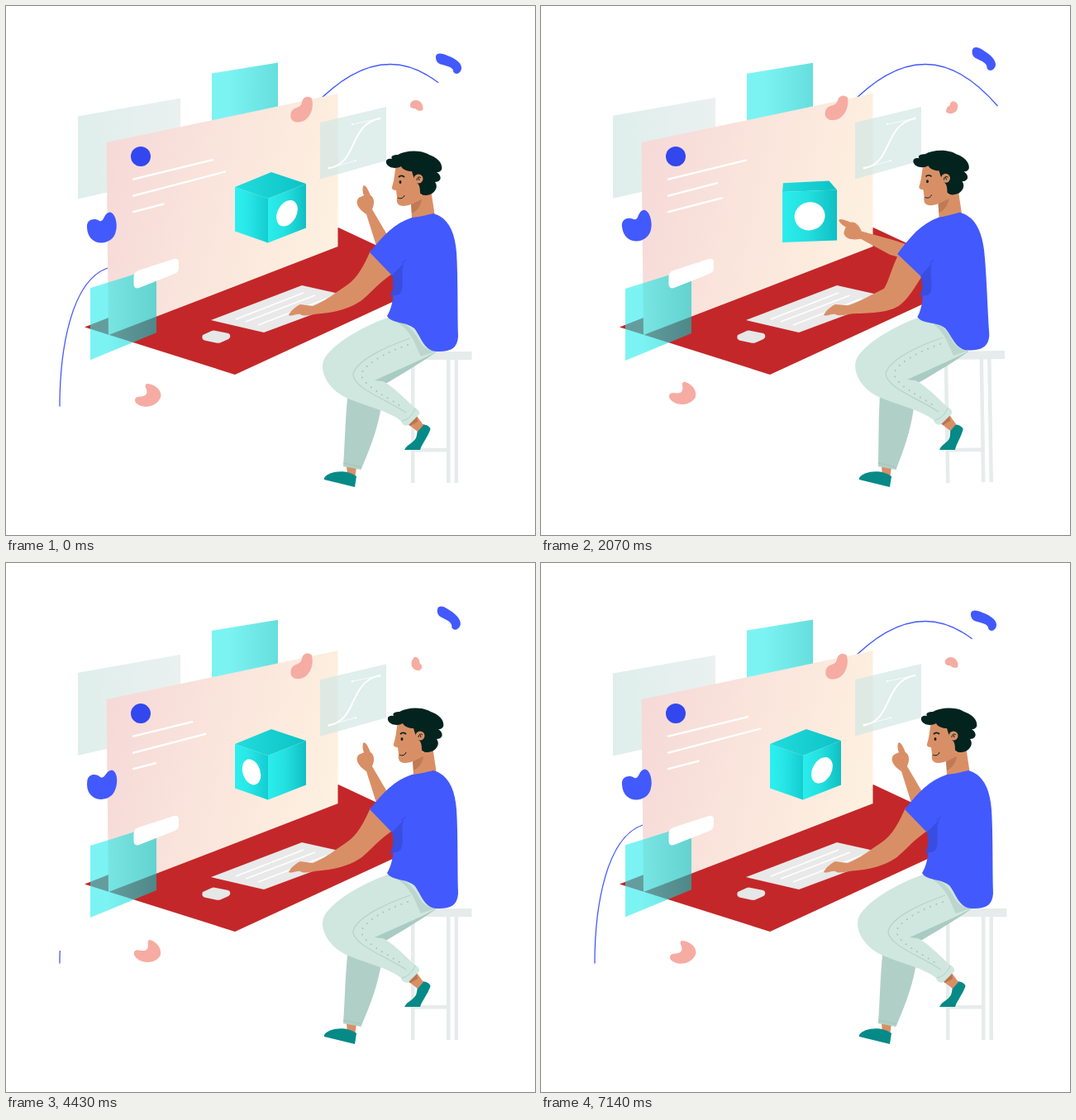
Write an HTML page that moves like this. It is 640 by 640 pixels and loops after 7.21 s.

```html
<!DOCTYPE html>
<html lang="en">
<head>
<meta charset="utf-8">
<title>Desk scene</title>
<style>
html, body { margin: 0; width: 100%; height: 100%; overflow: hidden; background: #fff; }
svg { display: block; width: 100vw; height: 100vh; }
</style>
</head>
<body>
<svg viewBox="0 0 640 640" xmlns="http://www.w3.org/2000/svg">
<defs>
  <linearGradient id="screenFill" x1="0" y1=".35" x2="1" y2=".6">
    <stop offset="0" stop-color="#f6dad8"/><stop offset=".45" stop-color="#fae5dc"/><stop offset="1" stop-color="#fef1e0"/>
  </linearGradient>
  <linearGradient id="cyan"><stop offset=".25" stop-color="#25ebeb"/><stop offset="1" stop-color="#00c8c8"/></linearGradient>
  <linearGradient id="mist"><stop offset="0" stop-color="#dfeeeb"/><stop offset="1" stop-color="#eaf1f0"/></linearGradient>
  <linearGradient id="sideFill"><stop offset="0" stop-color="#2cf0f0"/><stop offset=".4" stop-color="#28e6e7"/><stop offset="1" stop-color="#13cdd0"/></linearGradient>
  <linearGradient id="faceFill"><stop offset="0" stop-color="#2bedec"/><stop offset=".45" stop-color="#24e0e1"/><stop offset="1" stop-color="#0fbfc3"/></linearGradient>
  <linearGradient id="topFill"><stop offset="0" stop-color="#22dcdd"/><stop offset="1" stop-color="#0cc2c5"/></linearGradient>
</defs>

<path id="mistLeft" d="M87 134L211 112V206L87 234Z" fill="url(#mist)"/>
<path id="cyanTop" d="M249 81L329 68V140L249 160Z" fill="url(#cyan)" opacity=".6"/>
<g fill="none" stroke="#4259fd" stroke-width="1.3">
  <path id="arcLeft" pathLength="1" d="M65 484.500C65 415 79 332 123 317"/>
  <path id="arcRight" pathLength="1" d="M372 121C402 90 432 70.500 465 70.500C500 70.500 530 95 552.500 121"/>
</g>

<path d="M95 388.500L402 268L531.700 328.500L277 446Z" fill="#c42729"/>
<path d="M248 380L358 338L425 353L312 395Z" fill="#e9e9e9"/>
<path d="M278 379L360 347M290 382L374 350M305 386L388 354" stroke="#fff" stroke-width="1.600"/>
<path d="M238 398L249 393Q251 392 254 393L269 396Q272 397 271 401Q270 403 267 404L259 407.500Q257 408 254 407.500L240 404.500Q236 403 238 398Z" fill="#e6e7e7"/>

<g id="screen">
  <path d="M121.500 165L401.500 106V291L124 398Z" fill="url(#screenFill)"/>
  <circle cx="163" cy="182" r="12" fill="#3347ee"/>
  <path id="lines" stroke="#fff" stroke-width="2.300" stroke-linecap="round"/>
  <path id="cubeTop" fill="url(#topFill)"/>
  <path id="cubeLeft" fill="url(#sideFill)"/>
  <path id="cubeFront" fill="url(#faceFill)"/>
  <path id="cubeRight" fill="url(#faceFill)"/>
  <circle id="dotA" r=".28" fill="#fff"/>
  <circle id="dotB" r=".28" fill="#fff"/>
</g>
<path id="cyanLow" d="M102 341L182 316V395L102 428Z" fill="url(#cyan)" opacity=".6"/>
<path id="bar" d="M154.500 328Q154.500 322 160 320L203 306Q209 304.500 209 310V317Q209 322 204 324L161 341Q154.500 343 154.500 336Z" fill="#fff"/>
<g id="mistRight">
  <path d="M380 141L460 122V187L380 209.500Z" fill="#d5e8e5" opacity=".72"/>
  <g fill="none" stroke="#fff">
    <path d="M391 196C426 190 414 144 452 136" stroke-width="2"/>
    <path d="M391 196L423 187M419 143L452 136" stroke-width=".8"/>
  </g>
  <g fill="#fff"><circle cx="391" cy="196" r="1.500"/><circle cx="452" cy="136" r="1.500"/><circle cx="423" cy="187" r="1.200"/><circle cx="419" cy="143" r="1.200"/></g>
</g>

<g fill="#4259fd">
  <path id="blobLeft" d="M98 268C97 258 107 256 113 260C119 262 118 250 126 249.500C133 251 135 265 133 272C130 291 99 293 98 268Z"/>
  <path id="blobRight" d="M520 62C520 56 528 57 534 60C545 64 552 70 551 76C549 83 544 83 541.500 80C541 74 535 73 528 71C522 70 520 66 520 62Z"/>
</g>
<g fill="#f6aca2">
  <path id="pinkTop" d="M489 120C489 114 496 113 500 115C504 118 505.500 123 504 126C500 128 497 126 495 124C491 124 489 123 489 120Z"/>
  <path id="pinkMid" d="M344.500 131C346 121 356 125 358 117C359 109.500 366 108 370 112C373 124 368 134 361 138.500C352 143 343 140 344.500 131Z"/>
  <path id="pinkLow" d="M156 476C158 470 167 475 170 469C172 464 166 460 170 457C178 457 188 463 187.500 472C184 485 166 488 158 481C156 479 156 478 156 476Z"/>
</g>

<g id="stool" fill="#e6eceb">
  <path d="M488 418H563.500V428H488ZM490 428H494.500V577H490ZM533 428H537.500V577H533ZM542.500 428H547V577H542.500ZM494 535H533V539.500H494Z"/>
</g>
<path d="M412 556L424 558L422 572L413 570Z" fill="#d98f66"/>
<path d="M385 571C390 562 413 560 424 569L422 582L385 573Z" fill="#058a87"/>
<g id="farLeg">
  <path d="M415 455L456 470C452 510 438 540 429.500 561L408 557C410 530 410 500 415 455Z" fill="#b0d0c7"/>
  <path d="M408 553L429 557.500" stroke="#a3c5bb" stroke-width="1"/>
</g>
<g id="shoe">
  <path d="M499 507C506 505 513 508 513.500 512C510 522 503 530 501 537L482 537C486 529 496 528 497 519Z" fill="#058a87"/>
</g>
<g id="nearLeg">
  <path d="M484 504L497 496L505 507L498 515Z" fill="#d98f66"/>
  <path d="M484 504L497 496L498 503L489 508Z" fill="#b97450"/>
  <path d="M442 456C455 436 490 418 508 412L520 419C500 433 478 446 461 456Z" fill="#a9cbc1"/>
  <path d="M462 377C438 385 397 406 385 427C378 442 390 465 414 475C438 485 463 490 478 502C479 506 483 509 487 507L500 494C501 488 495 487 491 483C480 472 465 458 456 454L446 453C467 443 497 431 519 419C505 415 502 400 495 388C485 376 470 378 462 377Z" fill="#cfe7df"/>
  <path d="M462 377C478 380 492 388 500 405C504 412 510 417 519 418L502 424C494 408 490 388 462 377Z" fill="#bcd6ce"/>
  <path d="M489 402C460 412 425 428 420 445C419 462 460 476 484 492" fill="none" stroke="#b9d1c9" stroke-width="1.200"/>
  <path d="M486 410C458 419 431 436 430 446C432 460 460 472 482 487" fill="none" stroke="#a5c3ba" stroke-width="2" stroke-linecap="round" stroke-dasharray="0 8"/>
  <path d="M479 502C487 500 492 495 495 487" fill="none" stroke="#b5d0c7" stroke-width="1"/>
</g>

<path id="farArm" fill="#d98f66" d="M-24 -71C-20 -70 -18 -63 -16 -59C-11 -56 -11 -49 -14 -42L6 -8L24 26L8 32L-9 2L-21 -36C-29 -41 -34 -48 -32 -53C-31 -57 -27 -57 -24 -59C-26 -63 -26 -70 -24 -71Z"/>
<path id="nearArm" fill="#d98f66"/>

<g id="head">
  <path d="M490 236L514 222L519 255C510 261 498 261 491 257Z" fill="#d98f66"/>
  <path d="M490 240L503 234C502 242 497 248 491 251Z" fill="#bf7a56"/>
  <path d="M472 192C470 203 470 210 467 219C466 222 470 223 472 223L473 231C472 238 474 242 481 242C491 241 498 237 502 229L508 205L490 188Z" fill="#d98f66"/>
  <path d="M460 190C459 185 463 184 467 185C465 182 468 180 474 180C484 174 503 174 512 180C522 183 529 191 527 198C525 201 523 201 521 201C527 205 528 212 519 213C523 218 520 225 513 228C507 230 502 229 501 226C501 219 500 216 497 214C493 208 492 203 491 200C486 200 480 198 478 194C473 197 463 197 460 190Z" fill="#03231f"/>
  <circle cx="499" cy="209" r="5.500" fill="#d98f66"/>
  <path d="M497 211C497 207 500 206 502 208M499 208L500 211" fill="none" stroke="#03231f" stroke-width="1"/>
  <path d="M475 207C477 205 480 205 482 207" fill="none" stroke="#03231f" stroke-width="1.800"/>
  <ellipse cx="477" cy="213" rx="1.400" ry="2" fill="#03231f"/>
  <path d="M474 232C478 234 481 232 482 229" fill="none" stroke="#03231f" stroke-width="1"/>
</g>
<g id="torso">
  <path d="M491 256C499 255 509 253 517 251C535 256 543 273 545 298C547 330 546 370 547 400C546 414 538 419 520 418C505 416 502 400 494 390C483 381 467 385 461 375C466 368 471 350 468 327L440 298C457 277 470 263 491 256Z" fill="#4259fd"/>
  <path d="M467 326L484 308C475 317 483 335 478 346C474 353 467 347 463 354C468 346 470 338 467 326Z" fill="#394de0"/>
  <path d="M478 311L484 307" stroke="#394de0" stroke-width="1"/>
</g>
</svg>
<script>
const LOOP = 7210, FRAMES = 101, FPS = 14, CYCLE = 7.15;
const TIMES = [0, 0.857, 2.071, 3.214, 4.429, 5.571];
const el = {};
document.querySelectorAll('[id]').forEach(n => el[n.id] = n);
const set = (name, attr, value) => el[name].setAttribute(attr, value);
const move = (name, value) => set(name, 'transform', value);

// Cyclic monotone cubic through one value per entry of TIMES.
function key(vals, t) {
  const n = TIMES.length;
  const time = i => TIMES[(i + n) % n] + Math.floor(i / n) * CYCLE;
  const val = i => vals[(i + n) % n];
  const slope = i => (val(i + 1) - val(i)) / (time(i + 1) - time(i));
  const tangent = i => {
    const a = slope(i - 1), b = slope(i);
    return a * b > 0 ? 2 * a * b / (a + b) : 0;
  };
  let i = n - 1;
  while (i && t < TIMES[i]) i--;
  const h = time(i + 1) - time(i), s = (t - time(i)) / h, r = 1 - s;
  return r * r * (1 + 2 * s) * val(i) + s * s * (3 - 2 * s) * val(i + 1)
    + h * s * r * (r * tangent(i) - s * tangent(i + 1));
}

const clamp = x => Math.max(0, Math.min(1, x));
function ease(from, to, t) {
  const p = clamp((t - from) / (to - from));
  return p * p * (3 - 2 * p);
}
const wave = (t, peak, period) => Math.cos(2 * Math.PI * (t - peak) / period);
const bob = (t, peak) => wave(t, peak, CYCLE / 3);

function trim(name, from, to) {
  set(name, 'visibility', to - from > 0.002 ? 'visible' : 'hidden');
  set(name, 'stroke-dasharray', `${to - from} 3`);
  set(name, 'stroke-dashoffset', -from);
}

function mix(a, b, k) {
  const other = b.match(/[\d.]+/g);
  let i = 0;
  return a.replace(/[\d.]+/g, n => (+n + (other[i++] - n) * k).toFixed(2));
}

const ARM_REST = 'M441 296C434 312 425 330 412 338C400 346 385 358 371 363L356 361C349 364 343 371 342 374C346 376 352 372 356 373C362 377 372 372 382 372C405 370 425 362 435 352C444 344 452 334 470 322Z';
const ARM_LEAN = 'M428 302C418 320 418 336 417 344C402 350 385 358 372 362L356 361C349 364 343 371 342 374C346 376 352 372 356 373C362 376 372 372 382 372C405 373 428 374 438 364C448 355 452 344 458 326Z';

function drawLines(t) {
  const line = (y, mean, amp, peak, slope) => {
    const x = mean + amp * wave(t, peak, CYCLE / 2);
    return `M154 ${y}L${x} ${y - (x - 154) * slope}`;
  };
  set('lines', 'd', line(209.5, 244, 20, 2.85, 0.245) + line(229.5, 237.8, 27.2, 0.03, 0.262)
    + line(249, 200.6, 21.5, 2.4, 0.26));
}

// Top corners at rest (left, front, right, back) and halfway through the quarter turn.
const REST = [[277, 219], [317, 233], [363, 215], [321, 201]];
const HALF = [[293, 214], [292, 225], [358, 222.5], [348.5, 211.5]];

function drawCube(t) {
  const late = t > 3.25;
  const s = late ? 0 : ease(0.9, 3.25, t);
  const corner = REST.map((a, i) => {
    const c = REST[(i + 3) % 4];
    return a.map((v, j) => v * (1 - s) * (1 - 2 * s)
      + HALF[i][j] * 4 * s * (1 - s) + c[j] * s * (2 * s - 1));
  });
  const tall = 53.5 + 30 * s * (1 - s);
  const [l, f, r, b] = corner;
  const side = (name, p, q) => set(name, 'd', q[0] > p[0]
    ? `M${p}L${q}L${q[0]} ${q[1] + tall}L${p[0]} ${p[1] + tall}Z` : '');
  set('cubeTop', 'd', `M${l}L${f}L${r}L${b}Z`);
  side('cubeLeft', l, f);
  side('cubeFront', f, r);
  side('cubeRight', r, b);

  const dot = (name, p, q, alpha) => {
    move(name, `matrix(${q[0] - p[0]} ${q[1] - p[1]} 0 ${tall} ${(p[0] + q[0]) / 2} ${(p[1] + q[1] + tall) / 2})`);
    set(name, 'opacity', alpha);
  };
  dot('dotA', f, r, late ? ease(5.1, 5.7, t) : 1);
  dot('dotB', l, f, late ? 1 - ease(4.6, 5.1, t) : 0);
}

function drawBlobs(t) {
  const wobble = (name, x, y, turn, lift) =>
    move(name, `translate(0 ${key(lift, t)}) rotate(${key(turn, t)} ${x} ${y})`);
  wobble('blobLeft', 116, 268, [0, -4, -4, 13, 9, -7], [0, -1, -2, 1.5, -0.5, -2.5]);
  wobble('blobRight', 536, 70, [0, 1, 11, 16, 12, 4], [0, -2, -5.5, -1, -3, -6]);
  wobble('pinkMid', 358, 125, [0, 4, 5, 0, -1, 5], [0, -1, -2, -0.5, -0.5, -1]);
  wobble('pinkLow', 171, 471, [0, 4, 12, 17, 16, 6], [0, -1.5, -2.5, -1, -1.5, -1.5]);
  move('pinkTop', `translate(0 ${key([0, 1, 2, 1, 1, 2], t)}) rotate(${360 * t / CYCLE} 497 121)`);
}

function drawPerson(t) {
  const k = key([0, 1, 0.63, 0, 0, 0], t);
  const shear = (name, s, y) => move(name, `matrix(1 0 ${s * k} 1 ${-s * k * y} 0)`);
  move('stool', `rotate(${-1.45 * k} 492 577)`);
  shear('farLeg', 0.06, 560);
  shear('shoe', 0.18, 537);
  move('nearLeg', `translate(${-4.5 * k} ${-1.5 * k})`);
  move('torso', `translate(${-7 * k} ${-k}) rotate(${-3.8 * k} 500 405)`);
  move('head', `translate(${key([0, -15.5, -9.5, 1, 2, 2], t)} ${-k})`);
  set('nearArm', 'd', mix(ARM_REST, ARM_LEAN, k));
  move('farArm', `translate(${key([457, 434, 427, 457, 457, 457], t)} ${key([288, 299, 293, 288, 288, 288], t)}) `
    + `rotate(${key([0, -29.5, -44, 0, 0, 0], t)})`);
}

function draw(t) {
  const lift = 1 - bob(t, -0.15);
  const slide = (name, y) => move(name, `translate(0 ${y})`);
  slide('screen', lift);
  slide('bar', lift);
  slide('mistRight', lift * 1.2);
  slide('mistLeft', bob(t, 0.4) - 0.9);
  slide('cyanTop', 1.9 * bob(t, -0.25) - 1);
  slide('cyanLow', 2 * bob(t, -0.35) - 1);

  if (t < 3) trim('arcLeft', ease(0.645, 1.545, t), 1);
  else trim('arcLeft', 0, ease(4.26, 5.21, t));
  if (t < 1.5) trim('arcRight', 0, ease(-0.72, 0.28, t));
  else if (t < 6) trim('arcRight', ease(2.76, 3.76, t), 1);
  else trim('arcRight', 0, ease(6.43, 7.43, t));

  drawLines(t);
  drawCube(t);
  drawBlobs(t);
  drawPerson(t);
}

const start = performance.now();
function tick() {
  const ms = (performance.now() - start) % LOOP;
  draw(Math.min(FRAMES - 1, Math.floor(ms / LOOP * FRAMES + 0.1)) / FPS);
  requestAnimationFrame(tick);
}
tick();
</script>
</body>
</html>
```
